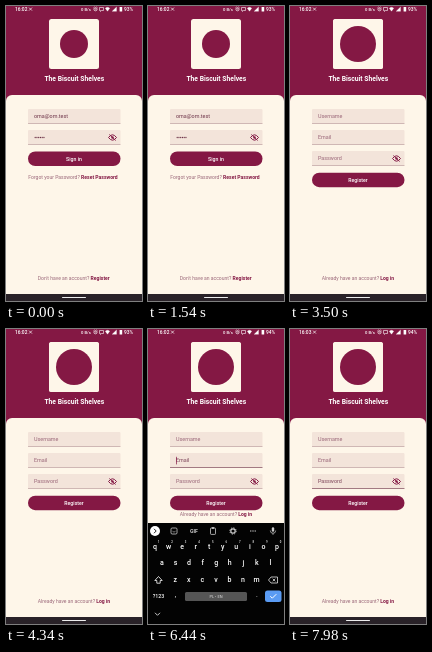
Write an HTML page that moves like this. It is 136 by 295 pixels and loops after 8000 ms.

```html
<!DOCTYPE html>
<html lang="en">
<head>
<meta charset="utf-8">
<title>Sign in and register</title>
<style>
html, body { margin: 0; height: 100%; overflow: hidden; background: #841844; }
svg { display: block; width: 100vw; height: 100vh; }
text { font-family: Roboto, "Noto Sans", sans-serif; }
</style>
</head>
<body>
<svg id="stage" viewBox="0 0 136 295"></svg>
<script>
const WINE = '#841844', CREAM = '#fef6e9', FIELD = '#f3e4da', SOFT = '#9a6678', LINE = '#b79a9b';
const LOOP = 8000, STEP = 140;

const rect = (x, y, w, h, fill, r = 0, extra = '') =>
  `<rect x="${x}" y="${y}" width="${w}" height="${h}" rx="${r}" fill="${fill}" ${extra}/>`;
const circle = (x, y, r, fill, extra = '') =>
  `<circle cx="${x}" cy="${y}" r="${r}" fill="${fill}" ${extra}/>`;
const path = (d, stroke = '#fff', width = 0.8, fill = 'none') =>
  `<path d="${d}" stroke="${stroke}" stroke-width="${width}" fill="${fill}" stroke-linejoin="round"/>`;
// y is the middle of the line
const text = (x, y, size, fill, s, { weight = 400, anchor = 'start', id = '' } = {}) =>
  `<text x="${x}" y="${y + size * 0.35}" font-size="${size}" fill="${fill}" font-weight="${weight}" text-anchor="${anchor}" ${id && `id="${id}"`}>${s}</text>`;
const mid = (x, y, size, fill, s, opts = {}) => text(x, y, size, fill, s, { anchor: 'middle', ...opts });

const eye = y => path(`M102.5 ${y}q4-5.4 8 0q-4 5.4-8 0z`, WINE, 1) +
  circle(106.5, y, 1.2, WINE) + path(`M103.3 ${y - 3}l6.4 6`, WINE, 0.9);

const field = (y, label, fill = SOFT, name = '') =>
  rect(22, y, 92.5, 15, FIELD, 1) +
  rect(22, y + 14.4, 92.5, 0.6, LINE, 0, name && `id="${name}Line"`) +
  text(28, y + 7.6, 5.4, fill, label, { id: name && name + 'Label' });

const button = (y, label) =>
  rect(22, y, 92.5, 14.5, WINE, 7.25) + mid(68, y + 7.4, 5.2, '#fff', label, { weight: 500 });

const link = (x, y, lead, action, id = '') =>
  mid(x, y, 5.05, SOFT, `${lead} <tspan font-weight="700" fill="${WINE}">${action}</tspan>`, { id });

function header() {
  const status = text(9, 3.2, 4.9, '#fff', '16:02', { weight: 500, id: 'clock' }) +
    path('M23 1.6l3 3m0-3l-3 3', '#fff', 0.7) +
    text(75, 3.2, 4.2, '#fff', '0 B/s', { weight: 500 }) +
    circle(89.5, 3.2, 1.6, 'none', 'stroke="#fff" stroke-width=".7"') +
    path('M87.5 1.5l1-1m3 1l-1-1M89.5 2.2v1.2h.8', '#fff', 0.5) +
    path('M93.5 1.5h4v3h-2l-1 1v-1h-1z', '#fff', 0.6) +
    path('M99.3 2.2q2.2-1.8 4.4 0l-2.2 3z', '#fff', 0.3, '#fff') +
    path('M110.5 1v4.3h-4.3z', '#fff', 0.3, '#fff') +
    rect(113.6, 1, 2.6, 4.6, '#fff', 0.4) +
    text(118, 3.2, 4.9, '#fff', '93%', { weight: 500, id: 'battery' });
  return rect(0, 0, 136, 295, WINE) + status + rect(43, 13, 50, 50, CREAM, 2.5) +
    mid(68.3, 72.5, 6.75, '#fff', 'The Biscuit Shelves', { weight: 700 }) +
    rect(0, 89, 136, 206, CREAM, 6);
}

const login = () =>
  circle(68, 38, 14, WINE) +
  field(103, 'oma@om.test', '#6d3348') + field(124, '') +
  Array.from({ length: 6 }, (_, i) => circle(29.2 + i * 1.75, 131.5, 0.65, '#6d3348')).join('') +
  eye(131.5) + button(145.5, 'Sign in') +
  link(67, 171, 'Forgot your Password?', 'Reset Password') +
  link(67.7, 272.2, "Don't have an account?", 'Register', 'toRegister') +
  circle(96, 272.5, 4, '#fff', 'id="touch" fill-opacity=".65" stroke="#eadfd6" stroke-width=".6"');

const register = () =>
  rect(0, 95, 136, 193, CREAM) + rect(43, 13, 50, 50, CREAM, 2.5) + circle(68, 38, 18, WINE) +
  ['Username', 'Email', 'Password'].map((s, i) => field(103 + i * 21, s, SOFT, 'f' + i)).join('') +
  rect(28, 106.8, 0.7, 7.6, WINE, 0, 'id="caret"') +
  eye(152.5) + button(166.7, 'Register') +
  `<g id="toLogin">${link(68, 271.8, 'Already have an account?', 'Log in')}</g>`;

function keyboard() {
  const row = (keys, x, y, size = 7) =>
    [...keys].map((k, i) => mid(x + i * 13.55, y, size, '#fff', k, { weight: 500 })).join('');
  const toolbar = circle(7, 202, 5, '#fff') + path('M6 199.8l2.2 2.2l-2.2 2.2', '#222', 1) +
    rect(23, 199, 6, 6, 'none', 1.2, 'stroke="#ccc" stroke-width=".8"') +
    path('M24.5 202.3q1.5 1.6 3 0', '#ccc', 0.6) +
    mid(46, 202, 5.2, '#ccc', 'GIF', { weight: 700 }) +
    rect(62.5, 199, 5, 6.4, 'none', 0.7, 'stroke="#ccc" stroke-width=".8"') + rect(63.8, 198.2, 2.4, 1.6, '#ccc') +
    circle(85, 202, 2.2, 'none', 'stroke="#ccc" stroke-width="1.2"') +
    circle(85, 202, 3.2, 'none', 'stroke="#ccc" stroke-width=".9" stroke-dasharray="1.25 1.26"') +
    [102.8, 105, 107.2].map(x => circle(x, 202, 0.65, '#ccc')).join('') +
    rect(123.8, 198.2, 2.4, 4.5, '#ccc', 1.2) + path('M122.3 201.5q0 2.8 2.7 2.8t2.7-2.8M125 204.3v1.6', '#ccc', 0.7) +
    row('1234567890', 10.5, 213.5, 2.8);
  return rect(0, 194, 136, 101, '#030303') +
    `<g id="toolbar">${toolbar}</g><g id="digits">${row('1234567890', 7, 202)}</g>` +
    row('qwertyuiop', 7, 217.5) + row('asdfghjkl', 14, 234) + row('zxcvbnm', 27.3, 251) +
    path('M10.5 247.5l3.7 4h-2v2.7h-3.4v-2.7h-2z') +
    path('M120.5 251l2.5-3h6.5v6h-6.5zM124.7 249.7l2.6 2.6m0-2.6l-2.6 2.6', '#fff', 0.7) +
    mid(10.5, 267.3, 5.3, '#fff', '?123', { weight: 500 }) +
    mid(27.5, 266, 7, '#fff', ',') + mid(109, 266, 7, '#fff', '.') +
    rect(37, 263, 62, 9, '#555', 1.5) + mid(68, 267.5, 4, '#ddd', '', { id: 'space' }) +
    rect(117, 261.5, 16.5, 11.5, '#5a9bf3', 2.5) + path('M122.3 267.2l2 2l4-4', '#fff', 1) +
    path('M7 283.8l2.5 2.5l2.5-2.5', '#ddd', 0.9);
}

document.getElementById('stage').innerHTML = header() +
  `<g id="login">${login()}</g><g id="register">${register()}</g>` +
  rect(0, 288, 136, 7, '#292228') + rect(56, 291, 24, 1, '#eee', 0.5) +
  `<g id="keyboard">${keyboard()}</g>`;

const el = id => document.getElementById(id);
const set = (id, name, value) => el(id).setAttribute(name, value);
const ramp = (t, start, length) => Math.min(1, Math.max(0, (t - start) / length));
const ease = p => 1 - (1 - p) ** 3;

function draw(ms) {
  const t = Math.floor(ms % LOOP / STEP) * STEP;
  const pressed = t >= 2660;
  const focus = t < 4900 ? -1 : t < 6020 ? 0 : t < 6580 ? 1 : 2;
  const resized = t >= 5040 && t < 7420;
  const shown = ease(ramp(t, 4760, 420)) - ease(ramp(t, 7280, 420));
  const fade = ramp(t, 2940, 280);

  el('clock').textContent = t < 7420 ? '16:02' : '16:03';
  el('battery').textContent = t < 6300 ? '93%' : '94%';
  set('toRegister', 'opacity', pressed ? 0.2 : 1);
  set('touch', 'opacity', pressed && t < 2940 ? 1 : 0);
  set('login', 'opacity', fade < 1 ? 1 : 0);
  set('register', 'opacity', fade);
  set('toLogin', 'transform', `translate(0 ${resized ? -87 : 0})`);

  for (let i = 0; i < 3; i++) {
    set(`f${i}Line`, 'fill', i === focus ? '#6d3348' : LINE);
    set(`f${i}Label`, 'fill', i === focus ? '#7d4459' : SOFT);
  }
  const blink = Math.floor((t - 5300) / 500) % 2 === 0;
  set('caret', 'opacity', focus >= 0 && blink ? 1 : 0);
  set('caret', 'y', 106.8 + Math.max(0, focus) * 21);

  set('keyboard', 'transform', `translate(0 ${(1 - shown) * 101})`);
  set('toolbar', 'opacity', focus === 2 ? 0 : 1);
  set('digits', 'opacity', focus === 2 ? 1 : 0);
  el('space').textContent = focus === 2 ? 'English' : 'PL • EN';
}

const start = performance.now();
function tick() {
  draw(performance.now() - start);
  requestAnimationFrame(tick);
}
tick();
</script>
</body>
</html>
```
